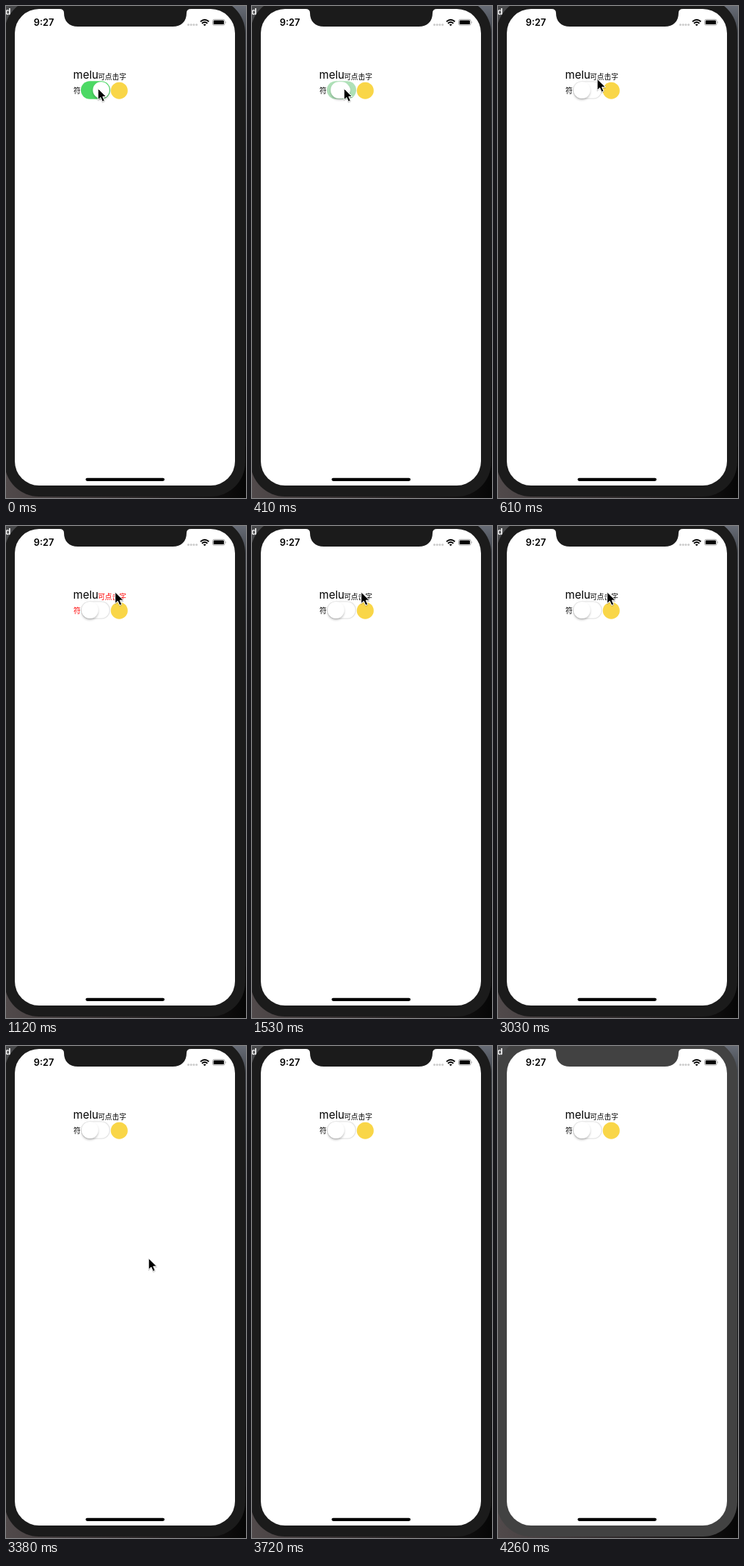
An HTML page that plays this animation: 327x670 px, repeating every 4360 ms.

```html
<!DOCTYPE html>
<html lang="zh">
<head>
<meta charset="utf-8">
<style>
html, body { margin: 0; width: 100%; height: 100%; overflow: hidden; background: #000; }
svg { display: block; width: 100%; height: 100%; }
.latin { font-family: Inter, sans-serif; }
.cjk { font-family: "Noto Sans CJK SC", "Noto Sans CJK", sans-serif; font-size: 9.7px; }
</style>
</head>
<body>
<svg viewBox="0 0 327 670">
  <defs>
    <linearGradient id="side" x2="0" y2="1">
      <stop offset="0" stop-color="#666b75"/>
      <stop offset=".05" stop-color="#454950"/>
      <stop offset=".3" stop-color="#24262b"/>
      <stop offset="1" stop-color="#050505"/>
    </linearGradient>
    <linearGradient id="floor">
      <stop offset="0" stop-color="#514a4b"/>
      <stop offset=".5" stop-color="#302b2c"/>
      <stop offset="1" stop-color="#060606"/>
    </linearGradient>
    <filter id="soft" x="-50%" y="-50%" width="200%" height="200%">
      <feDropShadow dx="0" dy="2" stdDeviation="1.5" flood-opacity=".27"/>
    </filter>
    <filter id="faint" x="-50%" y="-50%" width="200%" height="200%">
      <feDropShadow dx="0" dy=".8" stdDeviation=".7" flood-opacity=".35"/>
    </filter>
  </defs>

  <rect width="160" height="60" fill="#48494b"/>
  <rect x="160" width="167" height="670" fill="url(#side)"/>
  <rect y="600" width="327" height="70" fill="url(#floor)"/>
  <text class="latin" x="-1" y="12" font-size="12" font-weight="700" fill="#eee">d</text>

  <g id="bezel">
    <rect x="-2" y="-10" width="328" height="678" rx="47"/>
    <rect x="12" y="4" width="300" height="649" rx="33" fill="#fff"/>
    <path d="M73 3V4Q79 4 79 9.500C79 21 86 28 98 28H227C239 28 246 21 246 9.500Q246 4 252 4V3Z"/>
  </g>
  <rect x="108.500" y="642.700" width="107.500" height="4.300" rx="2.150"/>

  <text class="latin" x="37.800" y="27" font-size="12.800" font-weight="600">9:27</text>
  <g fill="#ccc">
    <circle cx="248.500" cy="25.500" r="1.500"/><circle cx="252.200" cy="25.500" r="1.500"/>
    <circle cx="255.900" cy="25.500" r="1.500"/><circle cx="259.600" cy="25.500" r="1.500"/>
  </g>
  <g fill="none" stroke="#000" stroke-width="1.900">
    <path d="M265 21.300Q270.700 16.300 276.400 21.300"/>
    <path d="M267 23.700Q270.700 20.500 274.400 23.700"/>
    <path d="M268.700 25.200Q270.700 23.600 272.700 25.200L270.700 27.200Z" fill="#000" stroke="none"/>
  </g>
  <rect x="281.500" y="18.300" width="16.600" height="8" rx="2.300" fill="none" stroke="#999" stroke-width=".8"/>
  <rect x="282.700" y="19.500" width="14.200" height="5.600" rx="1.200"/>
  <path d="M299 20.800Q300.600 22.300 299 23.800Z" fill="#999"/>

  <text class="latin" x="91.500" y="99" font-size="15">melu</text>
  <g id="link" class="cjk">
    <text x="125.200" y="99.500">可点击字</text>
    <text x="92" y="119.400">符</text>
  </g>

  <rect id="track" x="102" y="102.300" width="40" height="24.400" rx="12.200"/>
  <rect id="hole" fill="#fff"/>
  <rect id="thumb" y="103.300" height="22.400" rx="11.200" fill="#fff" filter="url(#soft)"/>
  <circle cx="154.300" cy="115.200" r="11.500" fill="#f9d648"/>

  <path id="cursor" d="M0 0V15.600L3.600 12.300L6.100 18L9 16.700L6.500 11.200H11.300Z"
        stroke="#fff" stroke-width="1" stroke-linejoin="round" filter="url(#faint)"/>
</svg>
<script>
const LOOP = 4360;
const $ = id => document.getElementById(id);
const set = (id, attrs) => {
  for (const k in attrs) $(id).setAttribute(k, attrs[k]);
};
const clamp = v => Math.max(0, Math.min(1, v));
const ease = v => v * v * (3 - 2 * v);
const mix = (a, b, p) => a + (b - a) * p;
const quad = (a, b, c, p) => mix(mix(a, b, p), mix(b, c, p), p);

// Number of pointer updates seen by time t, evenly spread from start to end.
const ticks = (t, start, end, count) =>
  Math.max(0, Math.min(count, Math.floor((t - start) / (end - start) * (count - 1) + 1.02)));

function drawSwitch(step) {
  const p = ease(clamp(step / 5));
  const wide = 22.4 + 4 * Math.sin(Math.PI * p);
  const left = mix(118.4, 103.1, p) - (wide - 22.4) * (1 - p);
  const tint = [[76, 229], [217, 229], [100, 229]].map(c => Math.round(mix(c[0], c[1], p)));
  const w = 37.4 * p, h = 21.8 * p;
  set('track', { fill: `rgb(${tint})` });
  set('hole', { x: 122 - w / 2, y: 114.5 - h / 2, width: w, height: h, rx: h / 2 });
  set('thumb', { x: left, width: wide });
}

function drawCursor(t, step) {
  const up = clamp((step - 4) / 4);
  const out = ease(ticks(t, 3210, 3720, 10) / 10);
  const x = mix(quad(125.3, 133.3, 148.7, up), 278, out);
  const y = mix(quad(112.3, 97.3, 90, up), 655, out);
  set('cursor', {
    transform: `translate(${x} ${y})`,
    visibility: t < 3720 ? 'visible' : 'hidden'
  });
}

function draw(t) {
  const step = ticks(t, 270, 730, 8);
  const lit = (t >= 1120 && t < 1530) || (t >= 2010 && t < 3030);
  drawSwitch(step);
  drawCursor(t, step);
  set('link', { fill: lit ? '#f00' : '#000' });
  set('bezel', { fill: t < 4260 ? '#1b1b1b' : '#424242' });
}

const begin = performance.now();
function frame() {
  draw((performance.now() - begin) % LOOP);
  requestAnimationFrame(frame);
}
frame();
</script>
</body>
</html>
```
